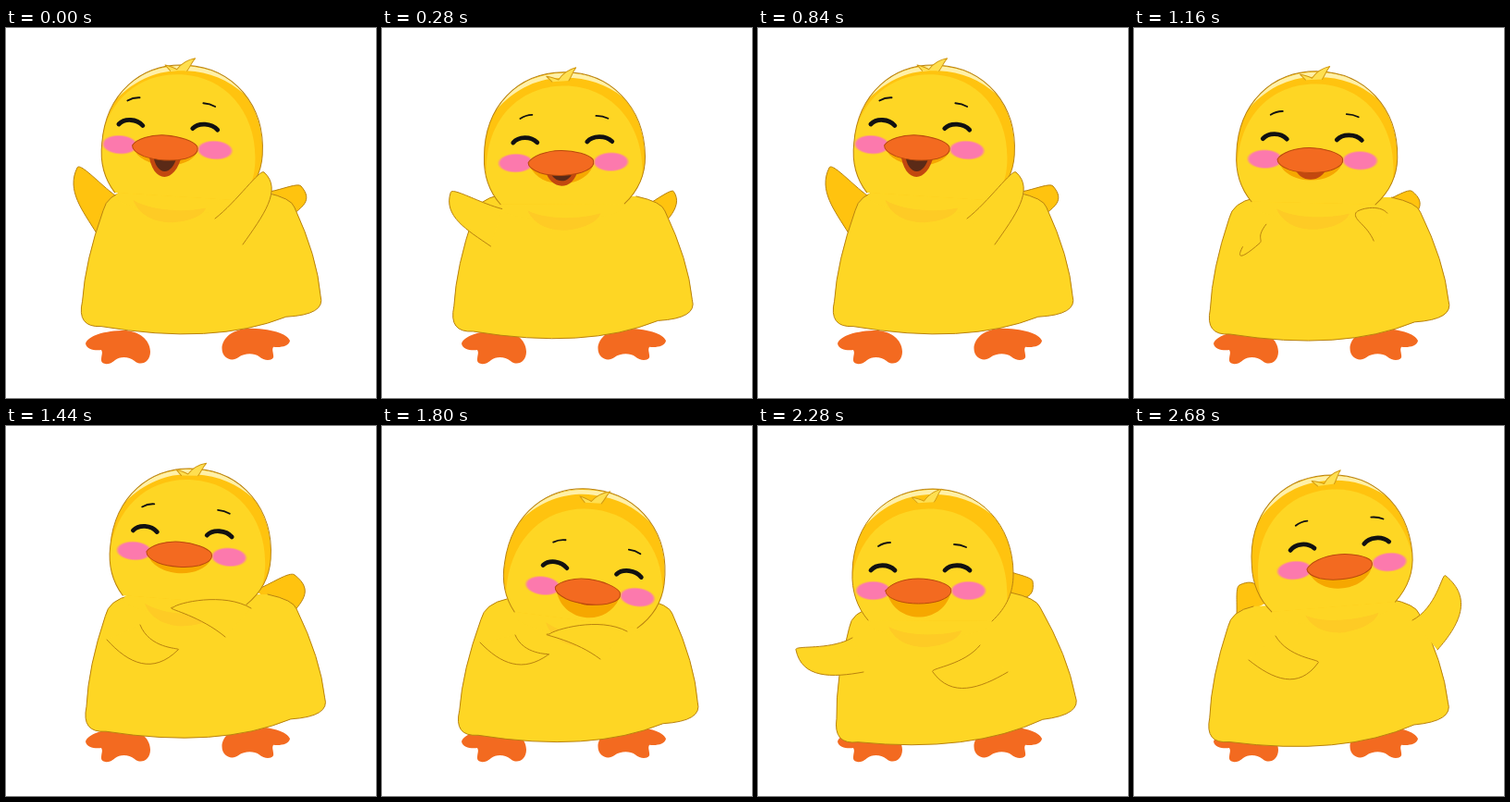
Animation of 400x400 px, one loop 2720 ms. Source, as an HTML page with a canvas:

```html
<!DOCTYPE html>
<html lang="en">
<head>
<meta charset="utf-8">
<title>Dancing duckling</title>
<style>
html, body { margin: 0; height: 100%; overflow: hidden; background: #fff; }
canvas { display: block; width: 100vw; height: 100vh; }
</style>
</head>
<body>
<canvas id="stage" width="400" height="400"></canvas>
<script>
const ctx = document.getElementById('stage').getContext('2d');
const LOOP = 2720, STEP = 40;
const YELLOW = '#fed624', GOLD = '#ffc30f', LINE = '#b9820f', ORANGE = '#f36a20';

// head: centre x, top, tilt, face x, face y, mouth opening
// body: sway of shoulders and hips, drop of left and right side
// tail: base, tip; wings: upper root, tip, lower root, bend
const up = {
  head: [190.5, 40, 3.3, -16, 90, 1], body: [3, 0, -10, -5], tail: [297, 190, 319, 171],
  left: [118, 181, 77, 151, 98, 222, 0], right: [226, 206, 279, 156, 256, 234, -3], behind: 'left'
};
const open = {
  head: [203, 54, -4, 10, 103.5, .4], body: [-8, -8, 0, 2], tail: [270, 215, 280, 205],
  left: [139, 207, 72, 199, 133, 247, 3], right: [290, 206, 344, 193, 300, 234, 0], behind: 'right'
};
const folded = {
  head: [199.5, 46, 3.8, -9.5, 93, 0], body: [5, 5, -2, -1], tail: [288, 192, 312, 161],
  left: [145, 215, 186, 242, 109, 231, -18], right: [265, 197, 181, 196, 237, 228, -18]
};
const low = {
  head: [219, 68, 7, 8.5, 110, .15], body: [5, 1, 2, 4], tail: [270, 215, 285, 205],
  left: [144, 226, 180, 247, 106, 234, -16], right: [265, 222, 181, 225, 236, 252, -18]
};
const aside = {
  head: [189, 68, 0, -13, 110, 0], body: [-5, 5, 11, -3], tail: [270, 172, 297, 168],
  left: [102, 229, 41, 242, 114, 266, 9], right: [240, 237, 189, 266, 270, 266, 11]
};
const wave = {
  head: [214, 53, -5, 10, 99.5, .1], body: [-1, 0, 10, 4], tail: [127, 199, 114, 172],
  left: [153, 227, 199, 256, 124, 253, -14], right: [301, 210, 337, 162, 328, 242, -14]
};
const moveTip = (wing, dx, dy) => wing.map((v, i) => v + (i === 2 ? dx : i === 3 ? dy : 0));
const wide = { ...open, left: moveTip(open.left, -28, 16), right: moveTip(open.right, 4, 14) };
const high = { ...folded, head: up.head.map((v, i) => (v + folded.head[i]) / 2) };
const reach = { ...wave, right: moveTip(wave.right, 45, 22) };
const keys = [
  [0, up], [520, open], [580, wide], [840, up], [880, up], [1040, wide],
  [1240, high], [1440, folded], [1800, low], [2280, aside], [2540, reach], [2680, wave]
];

const skull = new Path2D('M-70 142C-82 128-88 110-87 90C-86 36-50 0 0 0C50 0 87 38 87 92C87 112 80 128 64 143');
const shine = new Path2D('M-75 42C-56 10-25 1 0 1C25 1 48 9 64 28C45 13 25 6 0 6C-25 6-52 15-75 42');
const tuft = new Path2D('M-12 8L-18 2C-13 3-9 4-5 6C-1 0 6-5 14-7C10-2 9 3 6 7');
const chin = new Path2D('M-40-9C-20 2 18 1 39-5C36 5 18 12 0 13C-22 13-35 3-40-9');
const beak = new Path2D('M-38 0C-34-7-19-13-3-13C13-13 28-8 32-3C35 4 28 8 20 11C7 15-12 15-25 11C-33 8-38 5-38 0Z');
const eyes = new Path2D('M-54-22C-48-29-35-29-28-22M26-22C32-29 46-29 53-22');
const brows = new Path2D('M-46-48Q-40-52-33-52M36-50Q43-50 49-47');
const foot = new Path2D('M0 0C3-8 19-14 44-14C62-12 70-1 70 9C70 20 60 25 53 19C47 14 37 14 32 18C26 24 17 23 17 18C17 13 19 10 17 7C11 8 1 7 0 0Z');

const mix = (a, b, k) => a.map((v, i) => v + (b[i] - v) * k);
const offset = (p, dx, dy) => [p[0] + dx, p[1] + dy];

function poseAt(time) {
  let i = keys.length - 1;
  while (keys[i][0] > time) i--;
  const [start, a] = keys[i], [end, b] = keys[i + 1] || [LOOP, a];
  const u = (time - start) / (end - start), k = u * u * (3 - 2 * u);
  const pose = { behind: (k < .5 ? a : b).behind };
  for (const part of ['head', 'body', 'tail', 'left', 'right']) pose[part] = mix(a[part], b[part], k);
  return pose;
}

function paint(path, fill, stroke, width = 1) {
  if (fill) { ctx.fillStyle = fill; ctx.fill(path); }
  if (stroke) { ctx.strokeStyle = stroke; ctx.lineWidth = width; ctx.stroke(path); }
}

// Runs draw with its own origin, scale and rotation.
function placed(x, y, draw, sx = 1, sy = 1, degrees = 0) {
  ctx.save();
  ctx.translate(x, y);
  ctx.rotate(degrees * Math.PI / 180);
  ctx.scale(sx, sy);
  draw();
  ctx.restore();
}

// A rounded leaf, open at its root; bend curves it sideways.
function leaf([ax, ay, tx, ty, bx, by, bend]) {
  const rx = bx - ax, ry = by - ay;
  const dx = tx - (ax + bx) / 2, dy = ty - (ay + by) / 2, length = Math.hypot(dx, dy) || 1;
  const nx = dy / length * bend, ny = -dx / length * bend;
  const path = new Path2D();
  path.moveTo(ax, ay);
  path.bezierCurveTo(ax + .4 * (tx - ax) + nx, ay + .4 * (ty - ay) + ny, tx - .15 * rx, ty - .15 * ry, tx, ty);
  path.bezierCurveTo(tx + .6 * rx + nx, ty + .6 * ry + ny, bx + .5 * dx + nx, by + .5 * dy + ny, bx, by);
  return path;
}

function drawTail([x, y, tx, ty]) {
  const dx = (tx - x) * .6, dy = (ty - y) * .6;
  paint(leaf([x + dy, y - dx, tx, ty, x - dy, y + dx, 0]), GOLD, LINE);
}

// A soft trapezoid with a sagging hem.
function drawBody([top, bottom, left, right]) {
  const ls = [106 + top, 190 + left], lc = [76 + bottom, 334 + left];
  const rc = [346 + bottom, 315 + right], rs = [306 + top, 189 + right];
  const path = new Path2D();
  const curve = (control, end) => path.quadraticCurveTo(...control, ...end);
  path.moveTo(...offset(ls, 24, -5));
  curve(ls, mix(ls, lc, .12));
  curve(offset(mix(ls, lc, .5), -7, 0), mix(lc, ls, .2));
  curve(lc, mix(lc, rc, .1));
  curve(offset(mix(lc, rc, .55), 0, 27), mix(rc, lc, .16));
  curve(rc, mix(rc, rs, .16));
  curve(offset(mix(rc, rs, .5), 9, 0), mix(rs, rc, .08));
  curve(rs, offset(rs, -28, -6));
  paint(path, YELLOW, LINE);
}

function cup(x, y, halfWidth, bottom) {
  const depth = y + (bottom - y) * 4 / 3;
  return new Path2D(`M${x - halfWidth} ${y}C${x - halfWidth * .7} ${depth} ${x + halfWidth * .7} ${depth} ${x + halfWidth} ${y}Z`);
}

function drawCheek() {
  const glow = ctx.createRadialGradient(0, 0, .82, 0, 0, 1);
  glow.addColorStop(0, '#fc79ad');
  glow.addColorStop(1, '#fc79ad00');
  ctx.fillStyle = glow;
  ctx.fillRect(-1, -1, 2, 2);
}

function drawFace(faceY, mouth) {
  for (const x of [-51.5, 51.5]) placed(x, 0, drawCheek, 20, 10.7);
  paint(eyes, null, '#111', 4.8);
  paint(brows, null, '#111', 1.8);
  paint(cup(-2, 4, 34, 20 + .45 * (faceY - 91)), '#f6a700');
  if (mouth > .05) paint(cup(-2, 7, 18, 12 + 20 * mouth), '#c2480f');
  if (mouth > .5) paint(cup(-2, 8, 13, 8 + 18 * mouth), '#5b2a17');
  paint(beak, ORANGE, '#b94a0c');
}

function drawHead([x, top, tilt, faceX, faceY, mouth]) {
  placed(x, top + 90, () => {
    ctx.translate(0, -90);
    const neck = new Path2D();
    neck.ellipse(-3, 146, 66, 14, 0, 0, 7);
    paint(neck, YELLOW);
    ctx.save();
    ctx.clip(skull);
    paint(skull, GOLD);
    paint(shine, '#fff0a8');
    placed(.3 * faceX, 5 + .55 * (faceY - 80), () => paint(skull, YELLOW), .97);
    ctx.restore();
    paint(skull, null, LINE);
    placed(.35 * faceX, .4 * (faceY - 92), () => paint(tuft, '#ffdf50', '#d39a12'));
    placed(.6 * faceX, 158, () => paint(chin, '#fecb25'));
    placed(faceX, faceY, () => drawFace(faceY, mouth));
  }, 1, 1, tilt);
}

function draw(time) {
  const pose = poseAt(time);
  const wings = behind => ['left', 'right'].forEach(side => {
    if ((pose.behind === side) === behind) paint(leaf(pose[side]), behind ? GOLD : YELLOW, LINE);
  });
  ctx.fillStyle = '#fff';
  ctx.fillRect(0, 0, 400, 400);
  ctx.lineCap = ctx.lineJoin = 'round';
  placed(86, 341, () => paint(foot, ORANGE));
  placed(307, 338, () => paint(foot, ORANGE), -1.05, .95);
  drawTail(pose.tail);
  wings(true);
  drawBody(pose.body);
  drawHead(pose.head);
  wings(false);
}

function tick() {
  draw(Math.floor(performance.now() % LOOP / STEP) * STEP);
  requestAnimationFrame(tick);
}
tick();
</script>
</body>
</html>
```
